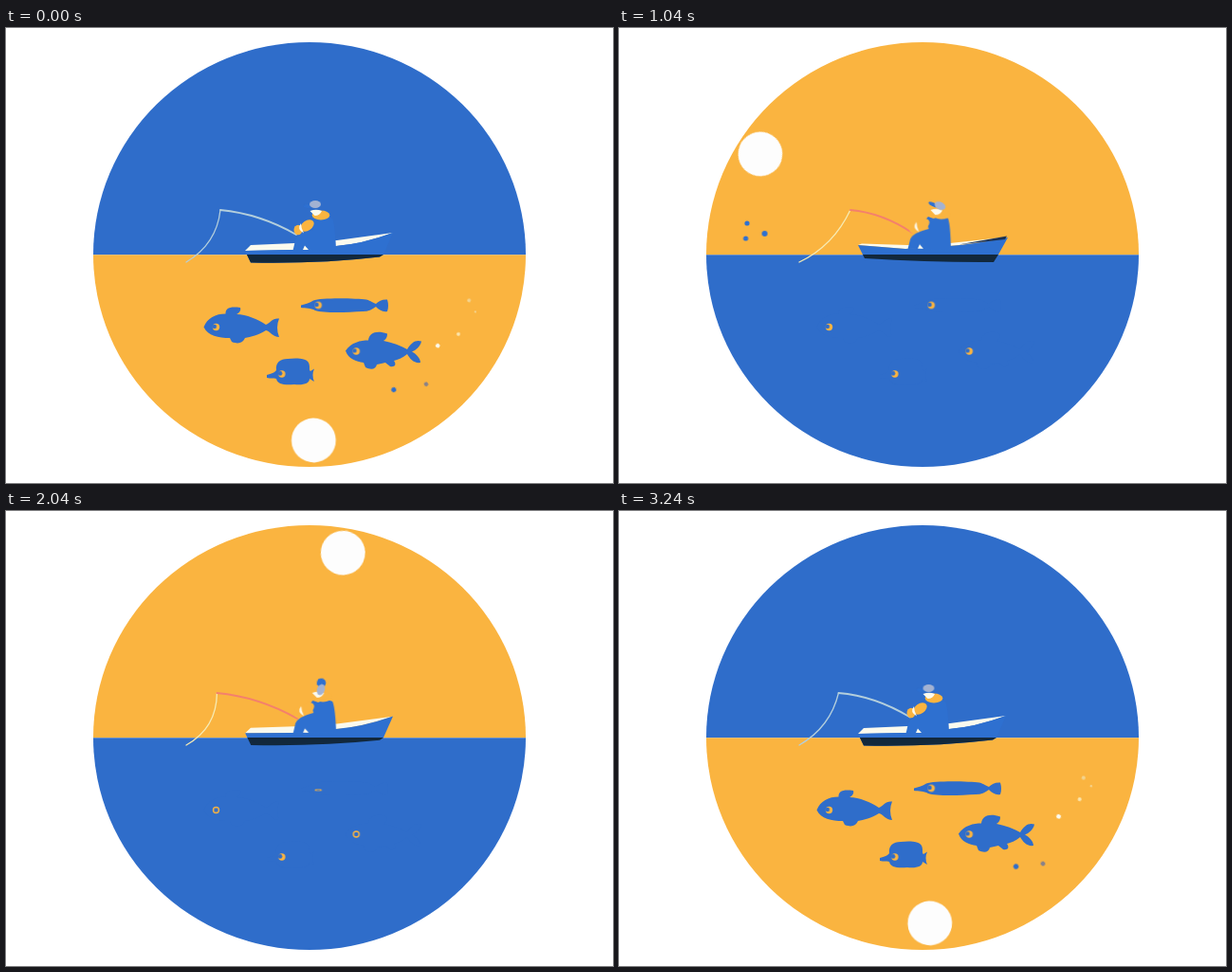
These frames come from a looping animation (640 px wide and 480 px high, 3280 ms). An HTML page:

```html
<!DOCTYPE html>
<html lang="en">
<head>
<meta charset="utf-8">
<title>Fishing day and night</title>
<style>
:root { --blue: #2f6dca; --coat: #2e70d0; --gold: #fab440; --dusk: #d0a45a; --cream: #fbfaee; }
html, body { margin: 0; width: 100%; height: 100%; overflow: hidden; background: #fff; }
svg { display: block; width: 640px; height: 480px; }

.sky, .sea, .sun, .cap, .brim, .face, .shade, .pupil, .lid, .night, .day {
  animation: 3280ms linear infinite;
}
.blue { fill: var(--blue); }
.coat { fill: var(--coat); }
.gold { fill: var(--gold); }
.cream { fill: var(--cream); }

/* Day and night */
.sky { animation-name: sky; }
.sea { animation-name: sea; }
@keyframes sky {
  0%, 23.5% { fill: var(--blue); }
  27.4% { fill: var(--dusk); }
  31%, 71.5% { fill: var(--gold); }
  75.61% { fill: var(--dusk); }
  80%, 100% { fill: var(--blue); }
}
@keyframes sea {
  0%, 23.5% { fill: var(--gold); }
  27.4% { fill: var(--dusk); }
  31%, 71.5% { fill: var(--blue); }
  75.61% { fill: var(--dusk); }
  80%, 100% { fill: var(--gold); }
}

/* Sun: slow at the top and bottom, fast across the horizon */
.sun { fill: #fdfdfd; animation-name: orbit; }
@keyframes orbit {
  0% { transform: rotate(-1.3deg) translateY(196px); animation-timing-function: cubic-bezier(.33,.15,.67,-.1); }
  18.29% { transform: rotate(25deg) translateY(195.5px); animation-timing-function: cubic-bezier(.33,.22,.67,.67); }
  31.71% { transform: rotate(121.6deg) translateY(201.3px); animation-timing-function: cubic-bezier(.33,.61,.67,.96); }
  46.34% { transform: rotate(179.1deg) translateY(197px); animation-timing-function: cubic-bezier(.33,.24,.67,-.1); }
  62.2% { transform: rotate(190.2deg) translateY(198px); animation-timing-function: cubic-bezier(.33,.13,.67,.47); }
  75.61% { transform: rotate(270.5deg) translateY(208px); animation-timing-function: cubic-bezier(.33,.84,.67,.93); }
  98.78% { transform: rotate(357.7deg) translateY(196px); }
  100% { transform: rotate(358.7deg) translateY(196px); }
}

/* Sparks trailing the sun */
.night { animation-name: trail; animation-delay: -400ms; }
@keyframes trail {
  0% { transform: rotate(calc(var(--a) - 9 * var(--v))) translateY(var(--r)) scale(0); }
  10.98% { transform: rotate(var(--a)) translateY(var(--r)) scale(1); }
  12.2% { transform: rotate(calc(var(--a) + var(--v))) translateY(var(--r)) scale(.95); }
  21.95%, 100% { transform: rotate(calc(var(--a) + 9 * var(--v))) translateY(var(--r)) scale(0); }
}
.day { animation-name: drift; animation-delay: -2320ms; }
@keyframes drift {
  0% { transform: translate(var(--p)) scale(0); }
  2.44% { transform: translate(var(--p)) scale(1); }
  17.07% { transform: translate(var(--q)) scale(var(--s)); }
  22.6%, 100% { transform: translate(var(--q)) scale(0); }
}

/* Boat rocking */
.hull, .deck, .man { animation: 1640ms ease-in-out infinite; }
.hull { animation-name: hull; }
.deck { animation-name: deck; }
.man { animation-name: lean; transform-origin: 325px 232px; }
@keyframes hull {
  0%, 20%, 92%, 100% { d: path("M252 235L258 247.5Q330 249 394 241.5L398 239L408 216Q375 228 348 230L302 234Z"); }
  37% { d: path("M253 230L260 243.5Q330 245 394 244L398 239L408 220Q375 228 348 230L302 233.5Z"); }
  50%, 63% { d: path("M252 229L259 243Q330 247.5 395 247L400 239L410 221Q375 228 348 230L302 233Z"); }
}
@keyframes deck {
  0%, 20%, 92%, 100% { d: path("M252 235L258 229L304 227L349 224L408 216Q375 228 348 230L302 234Z"); }
  37% { d: path("M252 231L258 227L304 228L349 228L408 221Q375 228 348 230.5L302 233.5Z"); }
  50%, 63% { d: path("M252 229L256 227.5L304 229L349 227L409 220.5Q375 228 348 230L302 233Z"); }
}
@keyframes lean {
  0%, 20%, 92%, 100% { transform: none; }
  40%, 62% { transform: translate(2px, -1px) rotate(1.5deg); }
}
.shade { animation-name: shade; }
@keyframes shade {
  0%, 14%, 38%, 100% { opacity: 0; }
  18.29%, 31.71% { opacity: 1; }
}

/* Head follows the sun */
.cap { animation-name: head; }
@keyframes head {
  0% { transform: translate(326px, 186px); }
  18.29% { transform: translate(328.5px, 185.5px); }
  31.71% { transform: translate(338.5px, 187.5px) rotate(25deg); }
  46.34% { transform: translate(335px, 188px) rotate(55deg); }
  50%, 62.2% { transform: translate(332px, 188.5px) rotate(110deg); }
  75.61% { transform: translate(328px, 189px) rotate(-5deg); }
  98.78% { transform: translate(326.5px, 187px); }
  100% { transform: translate(326px, 186px); }
}
.brim { animation-name: brim; }
@keyframes brim {
  0%, 31.71%, 75.61%, 100% { transform: scale(1, .7); }
  46.34% { transform: scale(.9, 1); }
  50%, 62.2% { transform: scale(.85, 1.6); }
}
.face { animation-name: face; }
@keyframes face {
  0%, 18.29%, 98.78%, 100% { transform: none; }
  31.71% { transform: translate(5px, 0); }
  46.34% { transform: translate(4px, -1px); }
  62.2% { transform: translate(2px, -1px); }
  75.61% { transform: translate(3px, 2px); }
}

/* Rod and line */
.rod, .line { fill: none; stroke-linecap: round; }
.rod { stroke-width: 1.8; animation: rod 1640ms ease-in-out infinite, rodTint 3280ms linear infinite; }
.line { stroke-width: 1.3; animation: line 1640ms ease-in-out infinite, lineTint 3280ms linear infinite; }
@keyframes rod {
  0%, 100% { d: path("M306 218Q268 196 226 192"); }
  20% { d: path("M307 219Q266 196 222 192"); }
  66% { d: path("M309 216Q278 195 244 192"); }
  97% { d: path("M307 217.5Q270 195 232 192"); }
}
@keyframes line {
  0%, 100% { d: path("M226 192Q222 228 190 247"); }
  20% { d: path("M222 192Q222 229 190 247"); }
  66% { d: path("M244 192Q226 230 190 247"); }
  97% { d: path("M232 192Q223 228 190 247"); }
}
@keyframes rodTint {
  0%, 23.5%, 82%, 100% { stroke: #b4cfdc; }
  31%, 76% { stroke: #f4806c; }
}
@keyframes lineTint {
  0%, 23.5%, 82%, 100% { stroke: #b4cfdc; }
  31%, 70% { stroke: #f6ebb4; }
  75.61% { stroke: #e3cf45; }
}

/* Fish eyes */
.pupil { animation-name: look; }
.pupil.early { animation-name: lookEarly; }
.pupil.aside { animation: none; transform: translate(-1.8px, -.6px); }
@keyframes look {
  0%, 33.5%, 85%, 100% { transform: translate(-1.8px, -.6px); }
  38%, 79% { transform: none; }
}
@keyframes lookEarly {
  0%, 33.5%, 74%, 100% { transform: translate(-1.8px, -.6px); }
  38%, 67% { transform: none; }
}
.lid { transform-origin: 0 3px; }
.lid.once { animation-name: blinkOnce; }
.lid.often { animation-name: blinkOften; }
@keyframes blinkOnce {
  0%, 59.5%, 65%, 100% { transform: none; }
  62.2% { transform: scaleY(.3); }
}
@keyframes blinkOften {
  0%, 15.8%, 20.8%, 43.8%, 48.8%, 73%, 78%, 100% { transform: none; }
  18.29%, 75.61% { transform: scaleY(.4); }
  46.34% { transform: scaleY(.3); }
}
</style>
</head>
<body>
<svg viewBox="0 0 640 480">
  <defs>
    <clipPath id="disc"><ellipse cx="320" cy="239" rx="228" ry="224"/></clipPath>
    <clipPath id="under"><rect x="92" y="239" width="456" height="30"/></clipPath>
  </defs>

  <g clip-path="url(#disc)">
    <rect class="sky" x="90" y="10" width="460" height="229.3"/>
    <rect class="sea" x="90" y="239.3" width="460" height="230"/>

    <g transform="translate(320 239)">
      <circle class="sun" r="23.4"/>
      <circle class="night" r="2.4" fill="#8a8288" style="--a:-43.7deg;--v:1.7deg;--r:184px"/>
      <circle class="night blue" r="2.7" style="--a:-36deg;--v:4deg;--r:168px"/>
      <circle class="night cream" r="2.4" style="--a:-60deg;--v:5.3deg;--r:166px"/>
      <circle class="night" r="2" fill="#fbe6ae" style="--a:-68.7deg;--v:6.7deg;--r:178px"/>
      <circle class="night" r="2" fill="#f3d490" style="--a:-76deg;--v:2deg;--r:175px"/>
      <circle class="night" r="1.2" fill="#f3d490" style="--a:-74deg;--v:3deg;--r:185px"/>
    </g>
    <circle class="day coat" r="3" style="--p:153.5px,217px;--q:186px,168px;--s:.85"/>
    <circle class="day coat" r="2.6" style="--p:133.5px,222px;--q:191px,215px;--s:.9"/>
    <circle class="day coat" r="2.6" style="--p:135px,206px;--q:160px,176px;--s:0"/>

    <g class="blue">
      <path d="M208.500 315.500C212 306 221 301.500 231.500 301.500C231.500 296 235 293.500 247 295C248 298 246 300.500 243 302C254 302.500 265 307 274 313C279 311 281 305.500 288 306.500Q284 316 288 326C281 326 279 320 274 319C266 324 258 326 252 327C250 332 245 334 238 331L236 327C224 327 213 325 208.500 315.500Z"/>
      <path d="M311 292.500C316 291 320 290 324 287.500C332 284 370 285 380 286.500C385 288 387 290 390 291C393 288 397 286 402 286.500Q404 293 402 299C397 300 393 297 390 294C386 297 382 299 376 299C360 300 335 301 326 298C321 295 316 296 311 295Z"/>
      <path d="M358 340.500C364 331.500 374 329.500 382 329.500C383 322 390 318.500 402 322.500C402 327 400 329 398 330C408 332 416 335 423 339C427 332 432 328.500 438 330.500C437 336 432 340 428 341.500C433 344 437 349 437 353C430 354 426 349 423 344C418 348 413 350 409 351C412 355 410 358 405 357L400 353Q396 354 391 355C390 360 385 361 379 358L377 353C369 352 361 349 358 340.500Z"/>
      <path d="M275 366C280 364.500 283 364 285 361C284 353 289 349 297 349C306 348 316 348 319 353C321 357 319 361 321 362L325 359.500Q322 366 325 373L320 370C320 375 314 377 304 376C294 377 286 376 285 370C282 369 279 370 275 369Z"/>
    </g>

    <g transform="translate(221.500 315.500)">
      <circle class="gold" r="3.7"/><circle class="blue pupil" r="2.3"/>
    </g>
    <g transform="translate(329.300 292.500)"><g class="lid once">
      <circle class="gold" r="3.7"/><circle class="blue pupil" r="2.3"/>
    </g></g>
    <g transform="translate(369.300 341)">
      <circle class="gold" r="3.7"/><circle class="blue pupil early" r="2.3"/>
    </g>
    <g transform="translate(290.800 365)"><g class="lid often">
      <circle class="gold" r="3.7"/><circle class="blue pupil aside" r="2.3"/>
    </g></g>

    <path class="line"/>
    <path class="deck cream"/>
    <path class="hull coat"/>
    <path class="shade" fill="#1b3050" d="M358 228.500L409 219.500L407 223Z"/>
    <g clip-path="url(#under)"><path class="hull" fill="#12283c"/></g>

    <g class="man">
      <path class="coat" d="M302.500 235L305 224Q308 217 324 213L321 203L323 200L329 202Q336 197 344 201Q347 208 348 234Z"/>
      <path class="cream" d="M313 234L315 229.500L319 234Z"/>
      <g class="face">
        <ellipse class="gold" cx="332" cy="197.500" rx="9.300" ry="5"/>
        <path class="cream" d="M320.500 193Q327 190.500 333 193Q331 198 325.500 198Z"/>
      </g>
    </g>
    <path class="rod"/>
    <g class="man">
      <ellipse class="gold" cx="317.500" cy="208.500" rx="8" ry="5.300" transform="rotate(-35 317.500 208.500)"/>
      <ellipse class="gold" cx="308" cy="213" rx="4.500" ry="5.300"/>
      <path class="cream" d="M311 206Q306 212 314 216.500Q311 211 311 206Z"/>
    </g>
    <g class="cap">
      <g transform="translate(-7 2)"><ellipse class="brim coat" rx="5.500" ry="3"/></g>
      <ellipse rx="6" ry="4" fill="#a3b2d2"/>
    </g>
  </g>
</svg>
</body>
</html>
```
